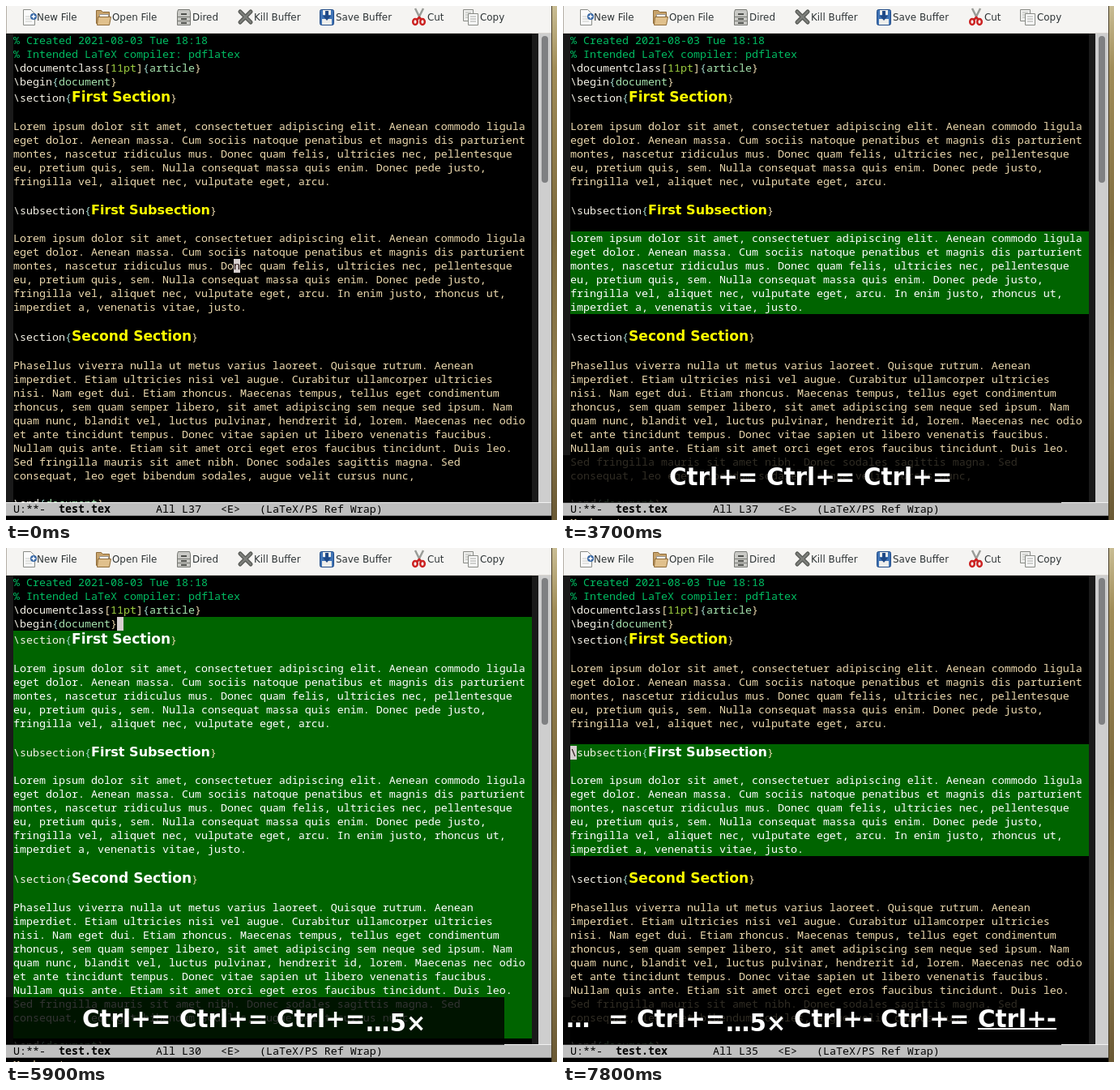
Write an HTML page that moves like this. It is 680 px wide and 634 px high and loops after 8000 ms.

```html
<!DOCTYPE html>
<html lang="en">
<head>
<meta charset="utf-8">
<title>Expanding a selection</title>
<style>
html, body { margin: 0; width: 100%; height: 100%; overflow: hidden; background: #000; }
svg { display: block; width: 680px; height: 634px; }
text { white-space: pre; }
.mono { font-family: "Noto Sans Mono", "DejaVu Sans Mono", monospace; font-size: 13.333px; }
.head { font-family: "DejaVu Sans", sans-serif; font-weight: bold; }
.bar { font-family: "DejaVu Sans", sans-serif; font-size: 11.9px; fill: #2e3436; }
.key { font-family: "DejaVu Sans", sans-serif; font-weight: bold; font-size: 29.4px; fill: #fff; }
</style>
</head>
<body>
<svg viewBox="0 0 680 634">
  <defs>
    <linearGradient id="desk" x1="0" y1="0" x2="0" y2="1">
      <stop offset="0" stop-color="#c9bd94"/>
      <stop offset=".12" stop-color="#a08c58"/>
      <stop offset=".45" stop-color="#7d6a3e"/>
      <stop offset=".75" stop-color="#8f7c4e"/>
      <stop offset="1" stop-color="#6a5934"/>
    </linearGradient>
    <clipPath id="page"><rect y="34" width="657" height="578"/></clipPath>
  </defs>
  <rect width="680" height="634" fill="#000"/>
  <rect x="673" width="7" height="634" fill="url(#desk)"/>
  <rect x="673" width="1" height="634" fill="#4a3f28"/>
  <rect y="34" width="9" height="578" fill="#1a1a1a"/>
  <rect x="649" y="34" width="8" height="578" fill="#1a1a1a"/>
  <rect x="657" y="34" width="16" height="578" fill="#cecece"/>
  <rect x="661" y="37" width="8" height="181" rx="4" fill="#7f8082"/>

  <rect width="673" height="34" fill="#f5f4f2"/>
  <rect y="33" width="673" height="1" fill="#d8d4d0"/>
  <rect width="1" height="34" fill="#b5b0a8"/>
  <g id="icons" stroke-width="1">
    <path d="M21.5 4.5h9l5 5v14h-14z" fill="#fafafa" stroke="#8a8c88"/>
    <path d="M24 13h8M24 16h8M24 19h8" stroke="#c8cac6"/>
    <circle cx="34" cy="13" r="4" fill="#3465a4"/>
    <path d="M31.500 13h5M34 10.500v5" stroke="#fff" stroke-width="1.500"/>

    <path d="M111.500 21.500v-16h6l2 2h8v14z" fill="#c7a36c" stroke="#8f6b38"/>
    <path d="M115.500 10.500h11v9h-11z" fill="#fff" stroke="#999"/>
    <path d="M113.500 13.500h16l-2 10h-15z" fill="#e0c08c" stroke="#8f6b38"/>

    <path d="M212.500 4.500h14l1 3v16h-16v-16z" fill="#c9c9c5" stroke="#777974"/>
    <path d="M212 13.500h15M212 18.500h15" stroke="#777974"/>
    <path d="M216 10h7M216 16h7M216 21h7" stroke="#50524e" stroke-width="2"/>

    <path d="M289 7l13 13M302 7l-13 13" stroke="#555753" stroke-width="5" stroke-linecap="round"/>
    <path d="M289 7l13 13M302 7l-13 13" stroke="#7c7e7a" stroke-width="2.500" stroke-linecap="round"/>

    <rect x="387.500" y="4.500" width="17" height="19" rx="2" fill="#3f73b5" stroke="#204a87"/>
    <path d="M391 5h10v6h-10zM390 16h12v7h-12z" fill="#eeeeec"/>
    <path d="M394 6h4v6h3l-5 6-5-6h3z" fill="#204a87"/>

    <path d="M505 3l7 14M515 3l-7 14" stroke="#9a9c98" stroke-width="2.500"/>
    <g fill="none" stroke="#cc2222" stroke-width="2.500">
      <ellipse cx="505" cy="19.500" rx="2.800" ry="3.500"/>
      <ellipse cx="514" cy="19.500" rx="2.800" ry="3.500"/>
      <path d="M507 17l3-3 3 3"/>
    </g>

    <path d="M564.500 4.500h12v14h-12z" fill="#eeeeec" stroke="#888a85"/>
    <path d="M567 8h7M567 11h7M567 14h7" stroke="#b4b6b2"/>
    <path d="M570.500 9.500h12v14h-12z" fill="#fafafa" stroke="#888a85"/>
    <path d="M573 13h7M573 16h7M573 19h7" stroke="#a4a6a2"/>
  </g>
  <g id="labels"></g>

  <g clip-path="url(#page)">
    <g id="region"></g>
    <g id="lines"></g>
    <g id="word">
      <rect x="265" y="312" width="40" height="17" fill="#006400"/>
      <text class="mono" x="265" y="325" fill="#fff">Donec</text>
    </g>
    <g id="cursor">
      <rect width="8" height="17" fill="#d6cfcf"/>
      <text class="mono" y="13" fill="#1c0808"></text>
    </g>
  </g>

  <rect y="612" width="673" height="17" fill="#bfbfbf"/>
  <rect y="612" width="673" height="1" fill="#f2f2f2"/>
  <rect y="628" width="673" height="1" fill="#8c8c8c"/>
  <text id="mode" class="mono" x="9" y="625" fill="#000"></text>
  <text id="echo" class="mono" x="9" y="642" fill="#f5deb3"></text>
  <g id="keys"></g>
</svg>
<script>
const NS = "http://www.w3.org/2000/svg";
const $ = id => document.getElementById(id);

function add(parent, tag, attrs, content) {
  const el = document.createElementNS(NS, tag);
  for (const name in attrs) el.setAttribute(name, attrs[name]);
  if (content !== undefined) el.textContent = content;
  parent.appendChild(el);
  return el;
}

const WHEAT = "#ecd9ae", COMMAND = "#f4f1e6", GREEN = "#006400",
      OPEN = "#9fd4cc", ARG = "#a6e3ae";
const lines = $("lines");
const tinted = [];   // parts that turn white inside the region

function mono(x, y, content, fill) {
  return add(lines, "text", { class: "mono", x, y, fill }, content);
}

function spans(y, parts) {
  const el = mono(9, y, "", WHEAT);
  for (const [content, fill] of parts) add(el, "tspan", { fill }, content);
}

function paragraph(top, rows) {
  rows.forEach((row, i) => {
    const y = top + 17 * i;
    tinted.push({ el: mono(9, y + 13, row, WHEAT), y, fill: WHEAT });
  });
}

function heading(top, base, command, title, size, end) {
  spans(base, [["\\" + command, COMMAND], ["{", OPEN]]);
  const x = 9 + 8 * (command.length + 2);
  const el = add(lines, "text",
    { class: "head", x, y: base, "font-size": size }, title);
  tinted.push({ el, y: top, fill: "#ffff00" });
  mono(end, base, "}", WHEAT);
}

mono(9, 47, "% Created 2021-08-03 Tue 18:18", "#00bd62");
mono(9, 64, "% Intended LaTeX compiler: pdflatex", "#00bd62");
spans(81, [["\\documentclass", COMMAND], ["[", WHEAT], ["11pt", "#9fd040"],
  ["]", WHEAT], ["{", OPEN], ["article", ARG], ["}", WHEAT]]);
spans(98, [["\\begin", COMMAND], ["{", OPEN], ["document", ARG], ["}", WHEAT]]);

const lorem = [
  "Lorem ipsum dolor sit amet, consectetuer adipiscing elit. Aenean commodo ligula",
  "eget dolor. Aenean massa. Cum sociis natoque penatibus et magnis dis parturient",
  "montes, nascetur ridiculus mus. Donec quam felis, ultricies nec, pellentesque",
  "eu, pretium quis, sem. Nulla consequat massa quis enim. Donec pede justo,"
];
const tail = "fringilla vel, aliquet nec, vulputate eget, arcu.";

heading(102, 118, "section", "First Section", 17.1, 203);
paragraph(140, [...lorem, tail]);
heading(242, 257, "subsection", "First Subsection", 16.03, 252);
paragraph(278, [...lorem, tail + " In enim justo, rhoncus ut,",
  "imperdiet a, venenatis vitae, justo."]);
heading(397, 413, "section", "Second Section", 17.1, 229);
paragraph(435, [
  "Phasellus viverra nulla ut metus varius laoreet. Quisque rutrum. Aenean",
  "imperdiet. Etiam ultricies nisi vel augue. Curabitur ullamcorper ultricies",
  "nisi. Nam eget dui. Etiam rhoncus. Maecenas tempus, tellus eget condimentum",
  "rhoncus, sem quam semper libero, sit amet adipiscing sem neque sed ipsum. Nam",
  "quam nunc, blandit vel, luctus pulvinar, hendrerit id, lorem. Maecenas nec odio",
  "et ante tincidunt tempus. Donec vitae sapien ut libero venenatis faucibus.",
  "Nullam quis ante. Etiam sit amet orci eget eros faucibus tincidunt. Duis leo.",
  "Sed fringilla mauris sit amet nibh. Donec sodales sagittis magna. Sed",
  "consequat, leo eget bibendum sodales, augue velit cursus nunc,"
]);
spans(618, [["\\end", COMMAND], ["{", OPEN], ["document", ARG], ["}", WHEAT]]);

[[39, "New File"], [132, "Open File"], [231, "Dired"], [307, "Kill Buffer"],
 [408, "Save Buffer"], [521, "Cut"], [586, "Copy"]].forEach(([x, label]) =>
  add($("labels"), "text", { class: "bar", x: x - 1, y: 18 }, label));

const mode = $("mode");
add(mode, "tspan", {}, "U:**-  ");
add(mode, "tspan", { "font-weight": "bold" }, "test.tex");
const place = add(mode, "tspan", {});

// Regions: [top, bottom]; the widest also covers the end of the row above.
const PARA = [278, 380], SUB = [242, 380], BODY = [102, 605];
const SPOT = { n: [281, 312, "n"], D: [265, 312, "D"], sub: [9, 244, "\\"], end: [137, 85, ""] };
const EQ = "Ctrl+=", MINUS = "Ctrl+-";

const cues = [
  [0, { at: "n", on: 1, line: 37, region: null, word: 0, keys: [], under: 0, echo: "" }],
  [100, { on: 0 }],
  [700, { on: 1 }],
  [1200, { on: 0 }],
  [1600, { at: "D", on: 1, word: 1, keys: [EQ], under: 1 }],
  [1700, { echo: "Type = to expand again, - to contract, 0 to reset" }],
  [1800, { under: 0 }],
  [2100, { on: 0 }],
  [3700, { word: 0, region: PARA, keys: [EQ, EQ, EQ], echo: "Mark set" }],
  [4100, { at: "sub", on: 1, line: 35, region: SUB, keys: [EQ, EQ, EQ, "…4×"], under: 1 }],
  [4300, { under: 0 }],
  [4600, { on: 0 }],
  [4900, { at: "end", on: 1, line: 30, region: BODY, keys: [EQ, EQ, EQ, "…5×"], under: 1 }],
  [5100, { under: 0 }],
  [5400, { on: 0 }],
  [5900, { on: 1 }],
  [6300, { on: 0 }],
  [6500, { on: 1, keys: [EQ, EQ, EQ, "…5×", MINUS], under: 1 }],
  [6600, { echo: "" }],
  [6700, { under: 0 }],
  [7100, { at: "sub", line: 35, region: SUB, keys: ["…", "=", EQ, EQ, "…5×", MINUS, EQ], under: 1 }],
  [7300, { under: 0 }],
  [7500, { on: 0 }],
  [7800, { on: 1, keys: ["…", "=", EQ, "…5×", MINUS, EQ, MINUS], under: 1 }]
];

const isCount = key => /^…\d/.test(key);
const keyWidth = key => isCount(key) ? 74 : { [EQ]: 110, [MINUS]: 97, "=": 25 }[key];

function drawKeys(keys, under) {
  const box = $("keys");
  box.replaceChildren();
  if (!keys.length) return;
  add(box, "rect", { y: 554, width: 615, height: 59, fill: "#000", "fill-opacity": .8 });
  const cut = keys[0] === "…";
  if (cut) add(box, "text", { class: "key", x: 4, y: 591 }, "…");
  const shown = cut ? keys.slice(1) : keys;
  const gap = (key, i) => i && !isCount(key) ? 10 : 0;
  const total = shown.reduce((sum, key, i) => sum + gap(key, i) + keyWidth(key), 0);
  let x = cut ? 609 - total : 306 - total / 2;
  shown.forEach((key, i) => {
    x += gap(key, i);
    const y = isCount(key) ? 596 : 591, width = keyWidth(key);
    add(box, "text", { class: "key", x, y }, key);
    if (under && i === shown.length - 1)
      add(box, "rect", { x, y: y + 1, width, height: 2, fill: "#fff" });
    x += width;
  });
}

function drawRegion(region) {
  const box = $("region");
  box.replaceChildren();
  const [top, bottom] = region || [0, 0];
  if (region) add(box, "rect", { x: 9, y: top, width: 640, height: bottom - top, fill: GREEN });
  if (region === BODY) add(box, "rect", { x: 137, y: 85, width: 512, height: 17, fill: GREEN });
  for (const { el, y, fill } of tinted)
    el.setAttribute("fill", y >= top && y < bottom ? "#fff" : fill);
}

function draw(s) {
  drawRegion(s.region);
  $("word").style.display = s.word ? "" : "none";
  const [x, y, letter] = SPOT[s.at];
  const cursor = $("cursor");
  cursor.style.display = s.on ? "" : "none";
  cursor.setAttribute("transform", `translate(${x} ${y})`);
  cursor.lastElementChild.textContent = letter;
  place.textContent = `       All L${s.line}   <E>   (LaTeX/PS Ref Wrap)`;
  $("echo").textContent = s.echo;
  drawKeys(s.keys, s.under);
}

let last = -1;
function tick() {
  const t = performance.now() % 8000;
  const past = cues.filter(cue => cue[0] <= t);
  if (past.length !== last) {
    last = past.length;
    draw(Object.assign({}, ...past.map(cue => cue[1])));
  }
  requestAnimationFrame(tick);
}
tick();
</script>
</body>
</html>
```
